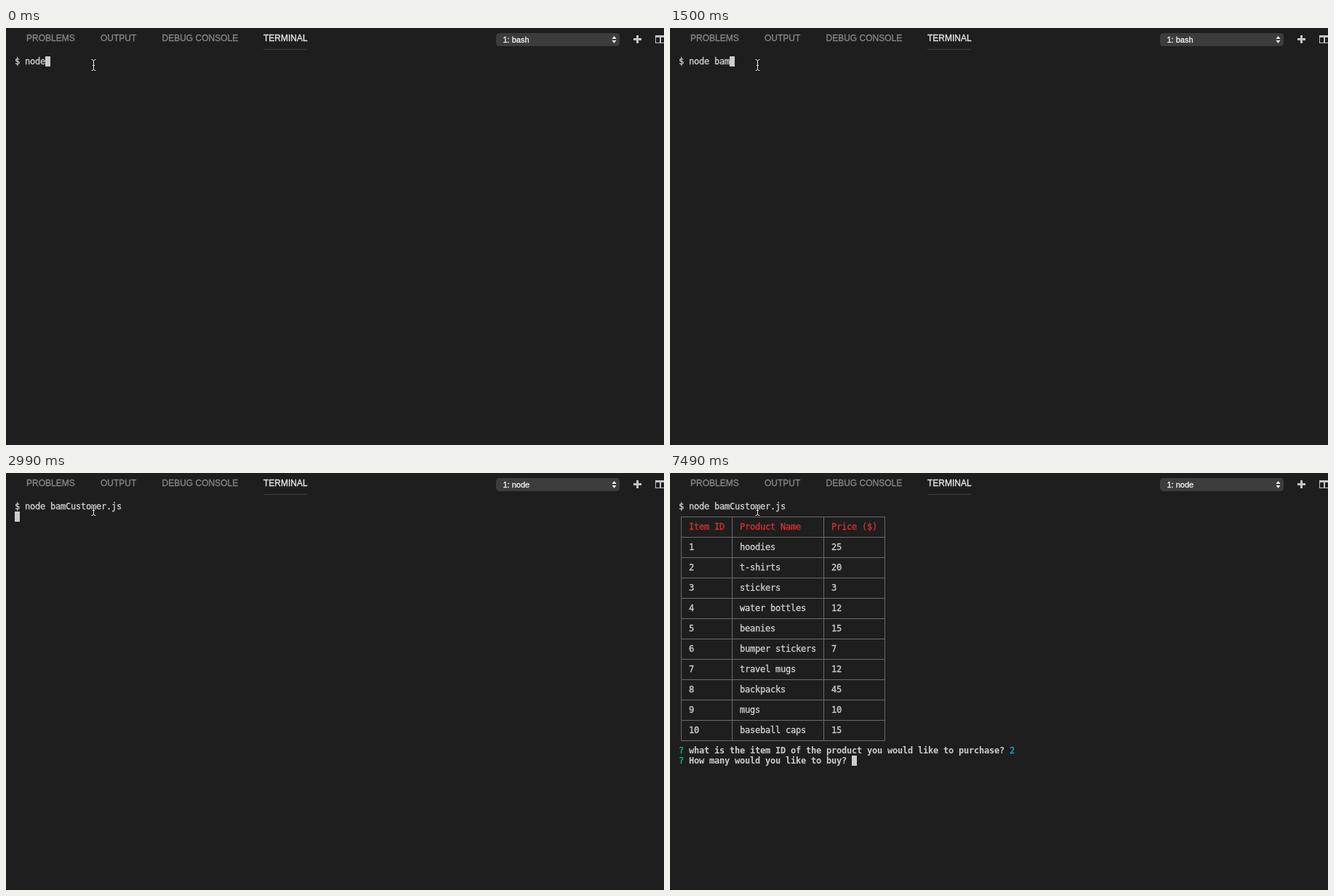
An HTML page with a canvas that plays this animation: 905x574 px, repeating every 8000 ms.

```html
<!DOCTYPE html>
<html lang="en">
<head>
<meta charset="utf-8">
<title>Terminal shop</title>
<style>
  html, body { margin: 0; width: 100%; height: 100%; overflow: hidden; background: #1e1e1e; }
  canvas { display: block; }
</style>
</head>
<body>
<canvas id="stage" width="905" height="574"></canvas>
<script>
const ctx = document.getElementById('stage').getContext('2d');
const LOOP = 8000, LEFT = 12, TOP = 39, CELL = 7, LINE = 14;
const FG = '#cccccc', RED = '#d62f2f', GREEN = '#0dbc79', CYAN = '#11a8cd', GREY = '#6a6a6a';
const SANS = '"Liberation Sans", Arial, sans-serif';
const MONO = '"DejaVu Sans Mono", Menlo, monospace';

const command = '$ node bamCustomer.js ';
// [time, characters visible]; the last step is a tab completion
const typing = [[0, 6], [900, 7], [1200, 8], [1350, 9], [1500, 10], [1800, 11], [1950, 22]];
const RUN = 2990, TABLE = 3440, ANSWER = 6140, NEXT = 7490;

const columns = [2, 12, 30];
const borders = [0, 10, 28, 40].map(col => LEFT + col * CELL + 3);
const header = ['Item ID', 'Product Name', 'Price ($)'];
const products = [
  ['hoodies', 25], ['t-shirts', 20], ['stickers', 3], ['water bottles', 12], ['beanies', 15],
  ['bumper stickers', 7], ['travel mugs', 12], ['backpacks', 45], ['mugs', 10], ['baseball caps', 15]
];

function rect(x, y, w, h, color) {
  ctx.fillStyle = color;
  ctx.fillRect(x, y, w, h);
}

// A thin outline gives the text a slightly heavier weight
function text(str, x, y, font, color, outline) {
  ctx.font = font;
  ctx.fillStyle = ctx.strokeStyle = color;
  ctx.lineWidth = outline;
  ctx.fillText(str, x, y);
  if (outline) ctx.strokeText(str, x, y);
}

function label(str, x, y, size, color) {
  text(str, x, y, `${size}px ${SANS}`, color, 0.35);
}

function poly(points, color) {
  ctx.fillStyle = color;
  ctx.beginPath();
  points.forEach(([x, y]) => ctx.lineTo(x, y));
  ctx.fill();
}

// Terminal text sits on a fixed character grid
function print(str, col, row, color = FG, bold = false) {
  const font = `${bold ? 'bold' : 'normal'} 12px ${MONO}`;
  [...str].forEach((ch, i) =>
    text(ch, LEFT + (col + i) * CELL, TOP + row * LINE + 11, font, color, bold ? 0 : 0.35));
}

function caret(col, row) {
  rect(LEFT + col * CELL, TOP + row * LINE, CELL, LINE, FG);
}

function ask(question, row) {
  print('?', 0, row, GREEN);
  print(question, 2, row, FG, true);
}

function drawHeader(shell) {
  label('PROBLEMS', 28, 18, 12, '#858585');
  label('OUTPUT', 130, 18, 12, '#858585');
  label('DEBUG CONSOLE', 214.5, 18, 12, '#858585');
  label('TERMINAL', 354, 18, 12, '#e7e7e7');
  rect(354, 29, 60, 1, '#404040');

  ctx.fillStyle = '#3c3c3c';
  ctx.beginPath();
  ctx.roundRect(674, 7, 170, 18, 4.5);
  ctx.fill();
  label('1: ' + shell, 683.5, 20, 11, '#f0f0f0');
  poly([[833.5, 15], [839.5, 15], [836.5, 11]], '#f0f0f0');
  poly([[833.5, 17], [839.5, 17], [836.5, 21]], '#f0f0f0');

  rect(863, 14, 11, 3, '#c5c5c5');
  rect(867, 10, 3, 11, '#c5c5c5');

  rect(893, 10, 12, 3, '#c5c5c5');
  rect(893, 20, 12, 1, '#c5c5c5');
  rect(893, 10, 1, 11, '#c5c5c5');
  rect(899, 10, 2, 11, '#c5c5c5');
}

function drawTable() {
  const width = borders[3] - borders[0] + 1;
  for (let i = 0; i < 12; i++) rect(borders[0], 60 + i * 28, width, 1, GREY);
  borders.forEach(x => rect(x, 60, 1, 309, GREY));
  header.forEach((title, i) => print(title, columns[i], 2, RED));
  products.forEach((product, n) =>
    [n + 1, ...product].forEach((value, i) => print(String(value), columns[i], 4 + n * 2)));
}

function drawPointer() {
  const beam = new Path2D(
    'M117.5 43.5 Q120.5 43.5 120.5 45.5 Q120.5 43.5 123.5 43.5' +
    'M120.5 45.5 V56.5 M117.5 58.5 Q120.5 58.5 120.5 56.5 Q120.5 58.5 123.5 58.5' +
    'M119 51.5 H122');
  ctx.lineWidth = 2.4;
  ctx.strokeStyle = '#151515';
  ctx.stroke(beam);
  ctx.lineWidth = 1;
  ctx.strokeStyle = '#f4f4f4';
  ctx.stroke(beam);
}

function draw(t) {
  rect(0, 0, 905, 574, '#1e1e1e');
  drawHeader(t < RUN ? 'bash' : 'node');

  const count = typing.filter(([at]) => at <= t).pop()[1];
  print(command.slice(0, count), 0, 0);

  if (t < RUN) caret(count, 0);
  else if (t < TABLE) caret(0, 1);
  else {
    drawTable();
    ask('what is the item ID of the product you would like to purchase?', 24);
    if (t >= ANSWER) print('2', 65, 24, t < NEXT ? FG : CYAN);
    if (t < NEXT) caret(t < ANSWER ? 65 : 66, 24);
    else {
      ask('How many would you like to buy?', 25);
      caret(34, 25);
    }
  }
  drawPointer();
}

const start = performance.now();
function frame() {
  draw((performance.now() - start) % LOOP);
  requestAnimationFrame(frame);
}
frame();
</script>
</body>
</html>
```
